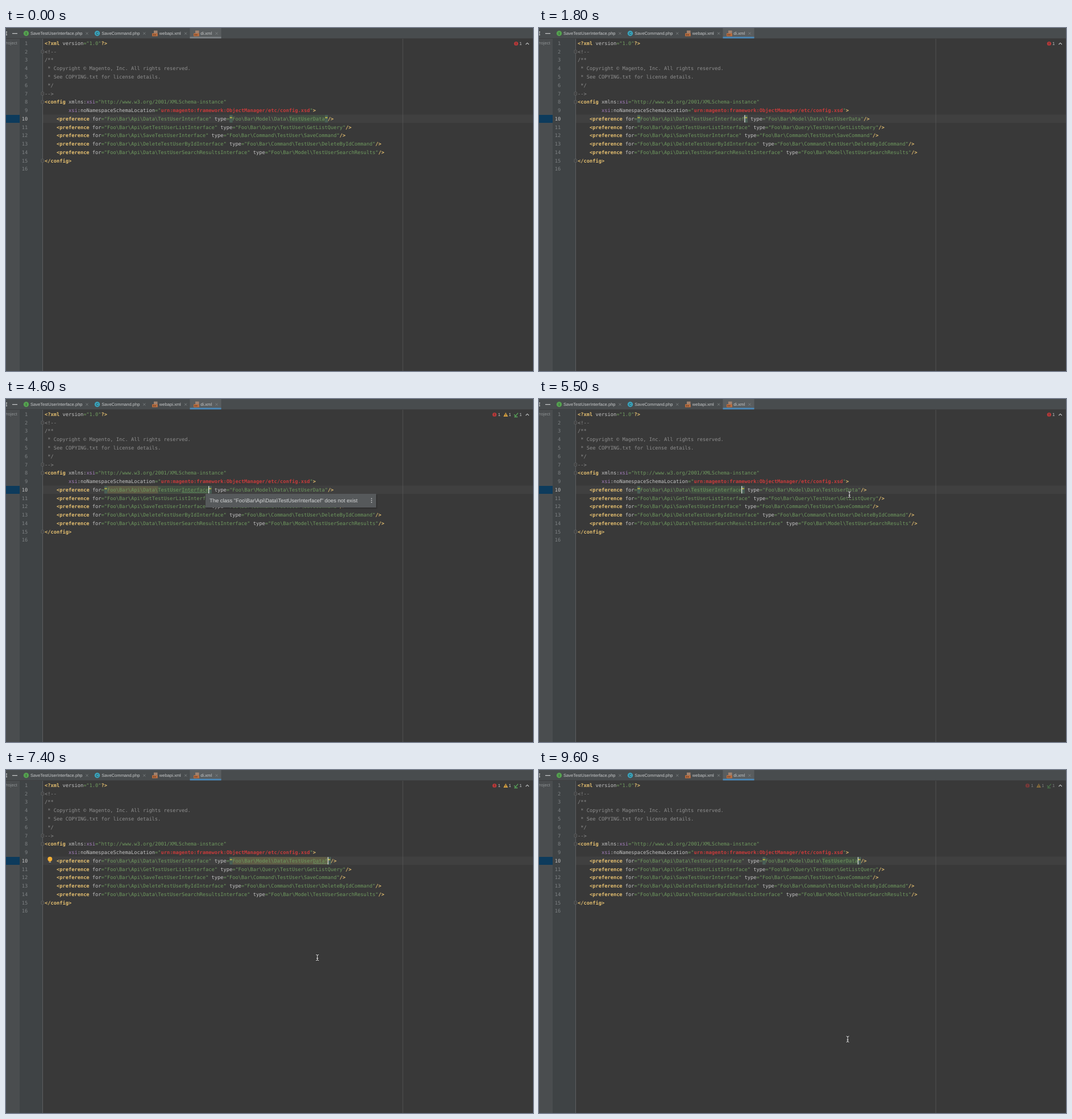
Recreate the animation shown at these times as an HTML page. Size 927 px wide and 604 px high, loop 9700 ms.

```html
<!DOCTYPE html>
<html lang="en">
<head>
<meta charset="utf-8">
<title>Editor inspection</title>
<style>
html, body { margin: 0; width: 100%; height: 100%; overflow: hidden; background: #393939; }
svg { display: block; width: 927px; height: 604px; }
text { white-space: pre; text-rendering: geometricPrecision; }
.code text { font: 8.714px "DejaVu Sans Mono", monospace; fill: #6f9a5f; }
.code .tag { fill: #e6c070; font-weight: bold; }
.code .attr { fill: #c4c4c4; }
.code .ns { fill: #a57fbd; }
.code .note { fill: #8f8f8f; }
.code .bad { fill: #c93b3b; font-weight: bold; }
.code .brace { fill: #ffe838; font-weight: bold; }
.code .num { fill: #7d8183; text-anchor: end; }
.code .now { fill: #c2c2c2; }
.ui text { font: 7.6px "Liberation Sans", Arial, sans-serif; fill: #c8cacb; }
.ui .tip { font-size: 9.39px; fill: #d4d6d7; }
.ui .letter { font-size: 6.5px; fill: #26382b; text-anchor: middle; }
.line { fill: none; stroke: #85898b; stroke-width: .8; }
.fold { stroke: #686b6c; stroke-width: .7; }
.beam { fill: none; stroke-linecap: round; }
</style>
</head>
<body>
<svg viewBox="0 0 927 604" xmlns="http://www.w3.org/2000/svg">
  <rect width="927" height="604" fill="#393939"/>
  <rect y="18" width="25" height="586" fill="#4a4d4f"/>
  <rect x="24" y="18" width="40" height="586" fill="#3f4345"/>
  <rect x="65" y="152.5" width="862" height="14.6" fill="#404040"/>
  <rect y="153" width="24" height="14" fill="#0d3b5c"/>
  <rect x="64" y="19" width="1" height="585" fill="#5d5f60"/>
  <rect x="697.5" y="19" width="1" height="585" fill="#525252"/>
  <g class="ui">
    <rect width="927" height="18" fill="#484c4e"/>
    <rect x="323.5" width="55" height="18" fill="#595d5f"/>
    <rect y="18" width="927" height="1" fill="#3d3e3f"/>
    <rect id="focus" x="323.5" y="15.5" width="55" height="2.8"/>
    <path d="M0 7h2M0 9.5h1.5M0 12h2M11 9.7h9" class="line" style="stroke:#c5c7c8;stroke-width:1.3"/>
    <text x="-4" y="29" style="fill:#8e9294">Project</text>
    <g id="tabs"></g>
    <g id="status"></g>
    <path d="M914.3 29l2.7-2.8 2.7 2.8" class="line" style="stroke:#c3c5c6;stroke-width:1.1"/>
  </g>
  <g id="marks"></g>
  <g class="code" id="lines"></g>
  <g class="code"><text id="edit" x="89" y="162.85"></text></g>
  <path id="typo" fill="none" stroke="#6ea56f" stroke-width=".8"/>
  <rect id="caret" y="153.3" width="1.2" height="13" fill="#e8e8e8"/>
  <g id="bulb">
    <circle cx="77.3" cy="156.8" r="4" fill="#f2ae35"/>
    <path d="M75.5 159h3.6v2.3h-3.6z" fill="#f2ae35"/>
    <path d="M75.5 162.4h3.6" stroke="#b5b7b8"/>
  </g>
  <g class="ui" id="tip"></g>
  <g id="mouse"></g>
</svg>
<script>
const LOOP = 9700, STEP = 100, CHAR = 5.246, LEFT = 68, PITCH = 14.77;
const $ = id => document.getElementById(id);
const colX = col => LEFT + col * CHAR;
const baseY = row => 29.9 + (row - 1) * PITCH;
const esc = s => s.replace(/&/g, '&amp;').replace(/</g, '&lt;');
const span = (cls, s) => `<tspan class="${cls}">${esc(s)}</tspan>`;
const quoted = (s, active) => active ? span('brace', '"') + s + span('brace', '"') : `"${s}"`;
const within = (t, from, to) => t >= from && t < to;
const show = (id, on) => $(id).setAttribute('visibility', on ? 'visible' : 'hidden');

function preference(iface, type, active) {
  return span('tag', '<preference') + span('attr', ' for') + '=' + quoted(iface, active === 'for') +
    span('attr', ' type') + '=' + quoted(type, active === 'type') + span('tag', '/>');
}

// Fixed document: [row, indent, markup]
const note = s => span('note', s);
const doc = [
  [1, 0, span('tag', '<?xml') + span('attr', ' version') + '="1.0"' + span('tag', '?>')],
  [2, 0, note('<!--')],
  [3, 0, note('/**')],
  [4, 1, note('* Copyright © Magento, Inc. All rights reserved.')],
  [5, 1, note('* See COPYING.txt for license details.')],
  [6, 1, note('*/')],
  [7, 0, note('-->')],
  [8, 0, span('tag', '<config') + span('attr', ' xmlns:') + span('ns', 'xsi') + '="http://www.w3.org/2001/XMLSchema-instance"'],
  [9, 8, span('ns', 'xsi') + span('attr', ':noNamespaceSchemaLocation') + '="' +
    span('bad', 'urn:magento:framework:ObjectManager/etc/config.xsd') + '"' + span('tag', '>')],
  [11, 4, preference('Foo\\Bar\\Api\\GetTestUserListInterface', 'Foo\\Bar\\Query\\TestUser\\GetListQuery')],
  [12, 4, preference('Foo\\Bar\\Api\\SaveTestUserInterface', 'Foo\\Bar\\Command\\TestUser\\SaveCommand')],
  [13, 4, preference('Foo\\Bar\\Api\\DeleteTestUserByIdInterface', 'Foo\\Bar\\Command\\TestUser\\DeleteByIdCommand')],
  [14, 4, preference('Foo\\Bar\\Api\\Data\\TestUserSearchResultsInterface', 'Foo\\Bar\\Model\\TestUserSearchResults')],
  [15, 0, span('tag', '</config>')]
];

function buildLines() {
  let out = '';
  for (const row of [2, 7, 8, 15]) {
    const y = baseY(row) - 3;
    out += `<path class="fold" fill="#393939" d="M62 ${y - 2.5}h4.5v5h-4.5zM63 ${y}h2.5"/>`;
  }
  out += doc.map(([row, indent, body]) => `<text x="${colX(indent)}" y="${baseY(row)}">${body}</text>`).join('');
  for (let row = 1; row <= 16; row++)
    out += `<text class="num${row === 10 ? ' now' : ''}" x="38.3" y="${baseY(row)}">${row}</text>`;
  $('lines').innerHTML = out;
}

const badge = (x, color, letter) =>
  `<circle cx="${x}" cy="9.5" r="4.7" fill="${color}"/><text class="letter" x="${x}" y="11.8">${letter}</text>`;
const fileIcon = x =>
  `<path d="M${x + 3} 4.5h6.5v5h-6.5z" fill="#a08370"/><path d="M${x} 9.3h9.8v5.2h-9.8z" fill="#bd6f40"/>` +
  `<path d="M${x + 1.5} 12h2M${x + 4.5} 12h2" stroke="#5a3722" stroke-width="1.5"/>`;

function buildTabs() {
  const tabs = [
    [badge(35.5, '#54a04f', 'I'), 43, 'SaveTestUserInterface.php', 142.5],
    [badge(160.5, '#3aa3bd', 'C'), 168.3, 'SaveCommand.php', 243.3],
    [fileIcon(257), 269.8, 'webapi.xml', 316],
    [fileIcon(330), 342.3, 'di.xml', 370.5]
  ];
  $('tabs').innerHTML = tabs.map(([icon, x, name, close]) =>
    `${icon}<text x="${x}" y="12.3">${name}</text><path class="line" d="M${close - 2} 7.6l4 4m0-4l-4 4"/>`).join('');
}

function buildMouse() {
  const d = 'M-2.2-5.2Q0-5.2 0-3.8Q0-5.2 2.2-5.2M0-4V4M-2.2 5.2Q0 5.2 0 3.8Q0 5.2 2.2 5.2M-1.2 1.2H1.2';
  const beam = (color, width) => `<path class="beam" d="${d}" stroke="${color}" stroke-width="${width}"/>`;
  $('mouse').innerHTML = beam('#222', 2.2) + beam('#f2f2f2', 1);
}

const error = x => `<circle cx="${x}" cy="27.5" r="3.6" fill="#b83a3a"/><path d="M${x} 25.5v2.4M${x} 28.8v1" stroke="#4b2525"/>`;
const one = x => `<text x="${x}" y="30.3">1</text>`;
const statusShort = error(897.3) + one(903);
const statusFull = error(859.3) + one(865.5) +
  '<path d="M879 23.7l4 7.2h-8z" fill="#d9a343"/><path d="M879 26v2.4M879 29v1" stroke="#54411d"/>' + one(884.3) +
  '<path d="M893.8 27.3l2.4 2.6 4.5-5.3M894 31.5h6" fill="none" stroke="#59a85a" stroke-width="1.3"/>' + one(903);

const tooltip = (x, width, name) =>
  `<rect x="${x + 1}" y="169" width="${width + 1}" height="24.5" fill="#000" opacity=".15"/>` +
  `<rect x="${x}" y="167" width="${width}" height="24" fill="#56595b"/>` +
  `<text class="tip" x="${x + 7}" y="182.4">The class "${name}" does not exist</text>` +
  [175.3, 178.6, 181.9].map(y => `<circle cx="${x + width - 8}" cy="${y}" r=".9" fill="#c9cbcc"/>`).join('');

// The two edits: one stray letter typed, inspected, then removed
const edits = {
  for: { path: 'Foo\\Bar\\Api\\Data\\', name: 'TestUserInterface', typoAt: 8,
    click: 1000, type: 1600, warn: 2200, bulb: 2700, tip: 3500, tipEnd: 4800,
    undo: 4500, clear: 4900, statusEnd: 5100, box: [351, 300] },
  type: { path: 'Foo\\Bar\\Model\\Data\\', name: 'TestUserData', typoAt: 8,
    click: 5700, type: 6200, warn: 6800, bulb: 7300, tip: 8000, tipEnd: 8600,
    undo: 9300, clear: 9500, statusEnd: LOOP, box: [556, 294] }
};

// Pointer moves: [start, end, hide, from, to]
const moves = [
  [300, 900, 1600, [540, 440], [362, 161]],
  [2500, 3000, 4500, [390, 230], [353, 162]],
  [5100, 5600, 6200, [400, 230], [563, 161]],
  [7200, 7800, 8500, [545, 390], [555.5, 160]],
  [8500, 8900, LOOP, [555.5, 160], [543, 474]]
];

function drawMouse(t) {
  const move = moves.find(([start, , hide]) => within(t, start, hide));
  show('mouse', move);
  if (!move) return;
  const [start, end, , from, to] = move;
  const p = Math.min(1, (t - start) / (end - start)), ease = p * p * (3 - 2 * p);
  const [x, y] = from.map((v, i) => v + (to[i] - v) * ease);
  $('mouse').setAttribute('transform', `translate(${x} ${y})`);
}

const mark = (col, len, color) =>
  `<rect x="${colX(col)}" y="153.2" width="${len * CHAR}" height="13.3" fill="${color}"/>`;

function zigzag(from, to) {
  let d = `M${from} 165`;
  for (let x = from, up = 1; x + 1.3 <= to; x += 1.3, up = -up) d += `l1.3 ${-up * .9}`;
  return d;
}

function draw(t) {
  const active = within(t, edits.for.click, edits.type.click) ? 'for' : 'type';
  const e = edits[active];
  const hasStray = id => within(t, edits[id].type, edits[id].undo);
  const value = id => edits[id].path + edits[id].name + (hasStray(id) ? 'f' : '');
  const iface = value('for'), type = value('type');
  $('edit').innerHTML = preference(iface, type, active);

  const start = active === 'for' ? 21 : 29 + iface.length;
  const nameCol = start + e.path.length;
  const end = start + value(active).length;
  const settled = t >= e.undo || within(t, e.click + 300, e.type) || t < edits.for.click;

  let marks = '';
  if (within(t, e.warn, active === 'for' ? e.clear : e.undo)) marks += mark(start, end - start, '#5e5c46');
  if (settled) marks += mark(nameCol, end - nameCol, '#424f42');
  $('marks').innerHTML = marks + mark(start - 1, 1, '#4a6056') + mark(end, 1, '#4a6056');

  const wave = within(t, e.warn, e.clear) ? zigzag(colX(nameCol + e.typoAt), colX(end)) : '';
  $('typo').setAttribute('d', wave);

  // The caret restarts its blink at every click or key press
  const touched = [e.undo, e.type, e.click].find(at => at <= t) ?? -700;
  $('caret').setAttribute('x', colX(end) - .5);
  show('caret', Math.floor((t - touched) / 500) % 2 === 0);

  show('bulb', within(t, e.bulb, e.undo));
  const tip = within(t, e.tip, e.tipEnd);
  $('tip').innerHTML = tip ? tooltip(...e.box, e.path + e.name + 'f') : '';

  const full = within(t, e.warn, e.statusEnd);
  $('status').innerHTML = full ? statusFull : statusShort;
  $('status').setAttribute('opacity', full && t >= e.undo + 200 ? .5 : 1);
  $('focus').setAttribute('fill', t < STEP ? '#7b8084' : '#4a88b8');
  drawMouse(t);
}

buildLines();
buildTabs();
buildMouse();
let last = -1;
const origin = performance.now();
function tick() {
  const t = Math.floor((performance.now() - origin) % LOOP / STEP) * STEP;
  if (t !== last) draw(last = t);
  requestAnimationFrame(tick);
}
tick();
</script>
</body>
</html>
```
